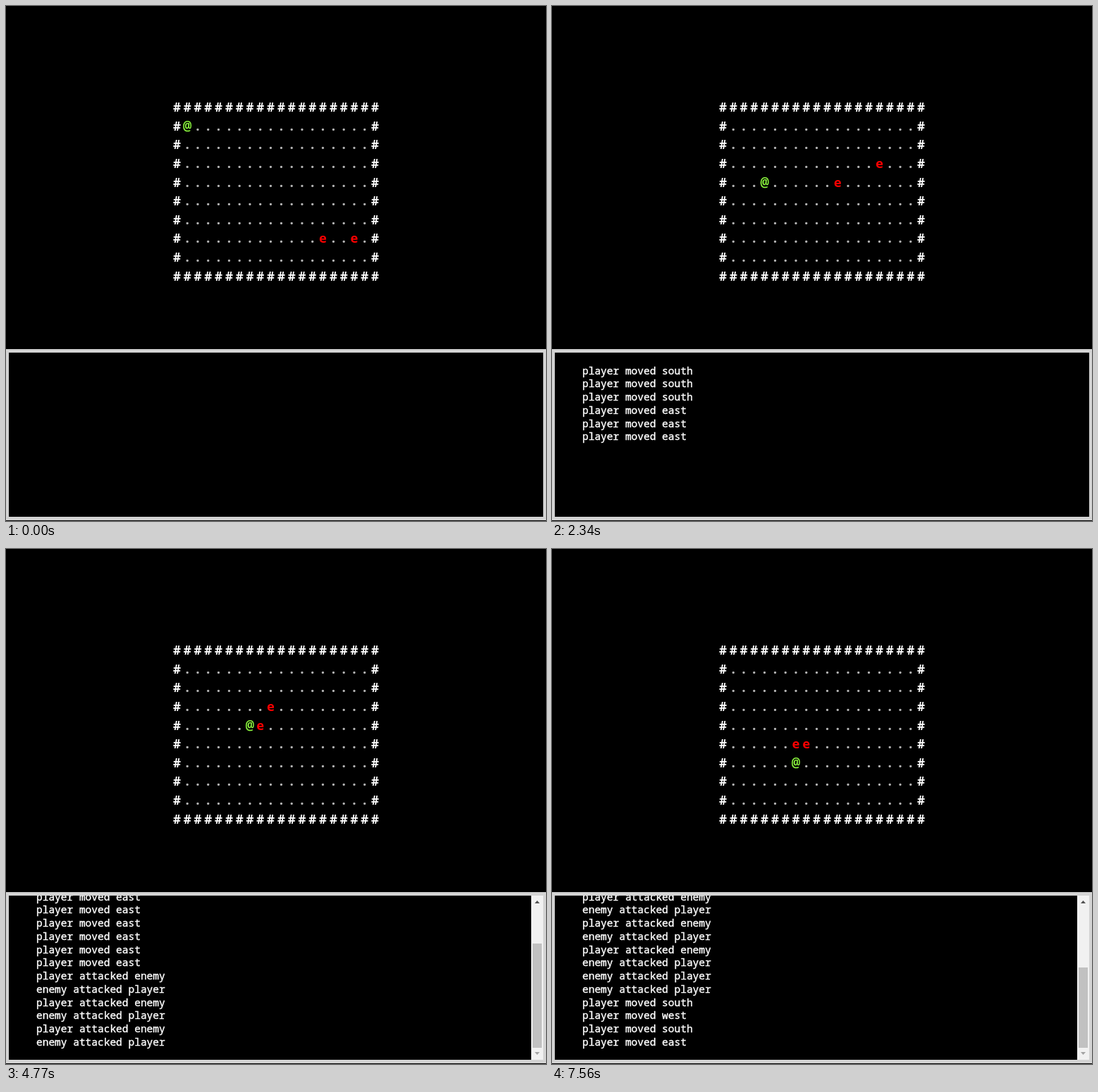
An HTML page that plays this animation: 766x731 px, repeating every 8000 ms.

```html
<!DOCTYPE html>
<html lang="en">
<head>
<meta charset="utf-8">
<style>
  html, body { margin: 0; width: 100%; height: 100%; overflow: hidden; background: #000; }
  svg { display: block; }
  text { font-family: "Noto Sans Mono", "DejaVu Sans Mono", monospace; }
  #map text { font-size: 18.3px; font-weight: 700; text-anchor: middle; }
  #map .player { font-size: 20.5px; font-weight: 400; stroke: #90ff40; stroke-width: .2px; }
  #log text { font-size: 14.5px; fill: #fff; stroke: #fff; stroke-width: .4px; }
</style>
</head>
<body>
<svg width="766" height="731">
  <g id="map"></g>
  <rect y="487" width="766" height="243" fill="#d3d3d3"/>
  <rect x="4" y="492" width="758" height="233" fill="#000"/>
  <svg id="log" x="4" y="492" width="741" height="233"></svg>
  <g id="bar">
    <rect x="745" y="492" width="17" height="233" fill="#f1f1f1"/>
    <path d="M750 503h7l-3.5-4z" fill="#505050"/>
    <path d="M750 714h7l-3.5 4z" fill="#a3a3a3"/>
    <rect id="thumb" x="747" width="13" fill="#c1c1c1"/>
  </g>
</svg>
<script>
const LOOP = 8000, COLS = 20, ROWS = 10;
const LINE = 18.75, VIEW = 233, TRACK = 199, MAX_LINES = 20;
const TURNS = [310, 710, 1100, 1560, 1960, 2340, 2740, 3120, 3530,
  3900, 4300, 4770, 5240, 5620, 6160, 6630, 7090, 7560];
const DIRS = { N: [0, -1], S: [0, 1], W: [-1, 0], E: [1, 0], '.': [0, 0] };
const NAMES = { N: 'north', S: 'south', W: 'west', E: 'east' };
const COLORS = { '#': '#fff', '.': '#b4b4b4', '@': '#90ff40', e: '#f00' };
const ESCAPE_TURN = 14;

// One letter per turn; a dot means standing still.
const actors = [
  { glyph: '@', x: 1, y: 1, path: 'SSSEEEEEE.....SWSE' },
  { glyph: 'e', x: 14, y: 7, path: 'NNNWWWWWW......SNS' },
  { glyph: 'e', x: 17, y: 7, path: 'NNNNWWWWWWWWWW.SS.' }
];

const byId = id => document.getElementById(id);
const map = byId('map'), log = byId('log'), bar = byId('bar'), thumb = byId('thumb');

function addText(parent, x, y) {
  const node = document.createElementNS('http://www.w3.org/2000/svg', 'text');
  node.setAttribute('x', x);
  node.setAttribute('y', y);
  return parent.appendChild(node);
}

const cells = Array.from({ length: COLS * ROWS }, (_, i) =>
  addText(map, 242.4 + 14.8 * (i % COLS), Math.floor(150.5 + 26.63 * Math.floor(i / COLS))));
const lines = Array.from({ length: MAX_LINES }, () => addText(log, 39, 0));

function setCell(x, y, glyph) {
  const cell = cells[y * COLS + x];
  cell.textContent = glyph;
  cell.setAttribute('fill', COLORS[glyph]);
  cell.classList.toggle('player', glyph === '@');
}

function drawMap(turn) {
  for (let y = 0; y < ROWS; y++)
    for (let x = 0; x < COLS; x++) {
      const wall = x % (COLS - 1) === 0 || y % (ROWS - 1) === 0;
      setCell(x, y, wall ? '#' : '.');
    }
  for (const { glyph, x, y, path } of actors) {
    let [cx, cy] = [x, y];
    for (const step of path.slice(0, turn)) {
      cx += DIRS[step][0];
      cy += DIRS[step][1];
    }
    setCell(cx, cy, glyph);
  }
}

function messages(turn) {
  const hit = 'enemy attacked player';
  return [...actors[0].path.slice(0, turn)].flatMap((step, i) => {
    if (step === '.') return ['player attacked enemy', hit];
    const move = 'player moved ' + NAMES[step];
    return i === ESCAPE_TURN ? [hit, hit, move] : [move];
  }).slice(-MAX_LINES);
}

function drawLog(turn) {
  const list = messages(turn);
  const height = list.length * LINE + 32;
  const scroll = Math.max(0, height - VIEW);
  lines.forEach((node, i) => {
    node.textContent = list[i] || '';
    node.setAttribute('y', Math.round(30.5 + i * LINE - scroll));
  });
  bar.style.display = scroll ? '' : 'none';
  const size = Math.round(TRACK * VIEW / height);
  thumb.setAttribute('y', 708 - size);
  thumb.setAttribute('height', size);
}

let shown = -1;
function frame() {
  const time = performance.now() % LOOP;
  const turn = TURNS.filter(t => t <= time).length;
  if (turn !== shown) {
    shown = turn;
    drawMap(turn);
    drawLog(turn);
  }
  requestAnimationFrame(frame);
}
frame();
</script>
</body>
</html>
```
